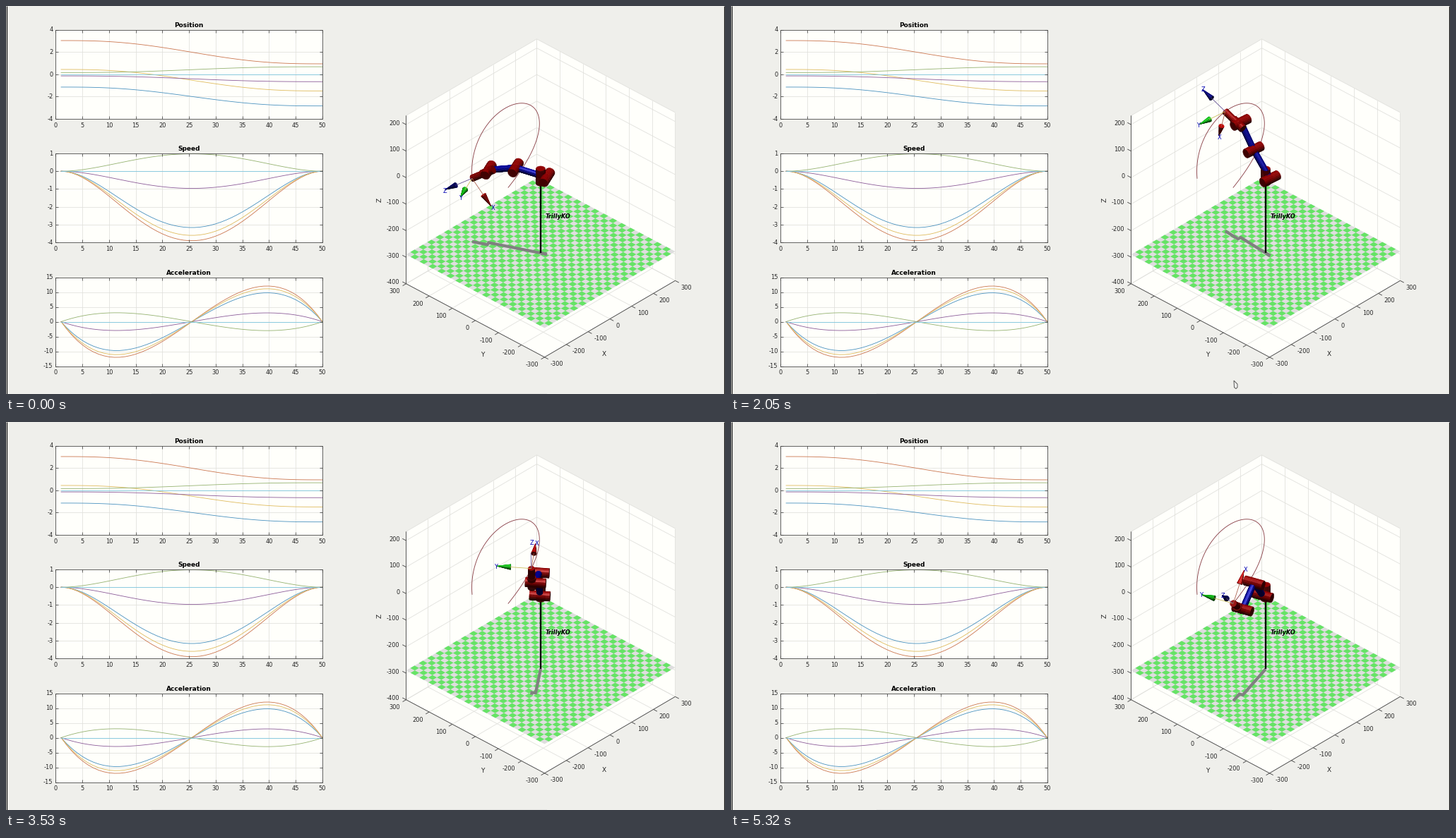
A matplotlib script for the animation above (5380 ms loop, 1018 by 550 pixels).

```python
import numpy as np
import matplotlib.pyplot as plt
from matplotlib.animation import FuncAnimation
from matplotlib.collections import LineCollection, PolyCollection
from matplotlib.patches import PathPatch, Polygon, Rectangle
from matplotlib.path import Path

W, H, DPI = 1018, 550, 64
PT = 72 / DPI                       # points per pixel
LOOP, TICK = 5380, 20
STEPS = 50

plt.rcParams["font.family"] = "DejaVu Sans"
BG, WALL, GRID, INK, EDGE = "#efefeb", "#fffffb", "#e0e0dc", "#262626", "#444444"

fig = plt.figure(figsize=(W / DPI, H / DPI), dpi=DPI, facecolor=BG)
ax = fig.add_axes([0, 0, 1, 1])
ax.set_xlim(-0.5, W - 0.5)
ax.set_ylim(H - 0.5, -0.5)
ax.axis("off")


def text(x, y, s, size=8.2, ha="center", color=INK, **kw):
    """Text whose capitals are centred on y."""
    return ax.text(x, y + 0.365 * size, s, fontsize=size * PT, ha=ha,
                   va="baseline", color=color, **kw)


def lines(segs, color, width=0.8, z=1):
    ax.add_collection(LineCollection(segs, colors=color,
                                     linewidths=width * PT, zorder=z))


def curve(x, y, color, width=0.85, z=2, **kw):
    return ax.plot(x, y, color=color, lw=width * PT, zorder=z, **kw)[0]


# ---- joint trajectory -------------------------------------------------

Q0 = np.array([-1.15, 3.02, 0.43, -0.15, 0.15, 0.0])
DQ = np.array([-1.69, -2.085, -1.925, -0.515, 0.522, 0.0])
TAU = np.linspace(0, 1, STEPS)


def blend(t):
    return 10 * t**3 - 15 * t**4 + 6 * t**5


def joints(t):
    return Q0 + DQ * blend(t)


# ---- left column: three charts ----------------------------------------

COLORS = ["#4a92c0", "#cb7650", "#dfbb5e", "#8c5c9a", "#95b271", "#7cc6de"]
LEFT, RIGHT = 70, 447.5


def chart(title, top, bottom, lo, hi, ticks, data):
    def px(v):
        return LEFT + (RIGHT - LEFT) * v / 50

    def py(v):
        return bottom - (bottom - top) * (v - lo) / (hi - lo)

    ax.add_patch(Rectangle((LEFT, top), RIGHT - LEFT, bottom - top, fc=WALL,
                           ec="none", zorder=0))
    grid, marks = [], []
    for v in range(0, 51, 5):
        x = px(v)
        grid.append([(x, top), (x, bottom)])
        marks += [[(x, bottom), (x, bottom - 4)], [(x, top), (x, top + 4)]]
        text(x, bottom + 8.7, str(v))
    for v in ticks:
        y = py(v)
        grid.append([(LEFT, y), (RIGHT, y)])
        marks += [[(LEFT, y), (LEFT + 4, y)], [(RIGHT, y), (RIGHT - 4, y)]]
        text(LEFT - 4, y, str(v), ha="right")
    frame = [(LEFT, top), (RIGHT, top), (RIGHT, bottom), (LEFT, bottom),
             (LEFT, top)]
    lines(grid, GRID)
    lines(marks + [frame], EDGE, 0.8, 3)
    text((LEFT + RIGHT) / 2, top - 7, title, 9, color="black", weight="bold")
    for row, color in zip(data.T, COLORS):
        curve(px(np.arange(1, STEPS + 1)), py(row), color)


T = TAU[:, None]
chart("Position", 33, 159.5, -4, 4, range(-4, 5, 2), joints(T))
chart("Speed", 208.5, 334.5, -4, 1, range(-4, 2),
      DQ * (30 * T**2 - 60 * T**3 + 30 * T**4))
chart("Acceleration", 384, 510, -15, 15, range(-15, 16, 5),
      DQ * (60 * T - 180 * T**2 + 120 * T**3))

# ---- right side: orthographic 3D box -----------------------------------

CENTER = np.array([756.5, 240.6])
AXES = np.array([[0.3083, -0.1808], [-0.3267, -0.1735], [0, -0.376]])
VIEW = np.array([-0.604, -0.569, 0.558])
LIGHT = np.array([-0.2, -0.12, 0.97])
HALF = (LIGHT + VIEW) / np.linalg.norm(LIGHT + VIEW)
TOP, BASE, FLOOR = 234, -400, -290
TEN = range(-300, 301, 100)


def proj(p):
    return CENTER + np.asarray(p, float) @ AXES


def face(corners, color, z):
    ax.add_patch(Polygon(proj(corners), fc=color, ec="none", zorder=z))


E = 300
face([(-E, E, BASE), (-E, E, TOP), (E, E, TOP), (E, E, BASE)], WALL, 0)
face([(E, E, BASE), (E, E, TOP), (E, -E, TOP), (E, -E, BASE)], WALL, 0)
face([(-E, E, BASE), (E, E, BASE), (E, -E, BASE), (-E, -E, BASE)], WALL, 0)

grid = []
for v in TEN:
    grid += [[(v, E, BASE), (v, E, TOP)], [(E, v, BASE), (E, v, TOP)],
             [(v, -E, BASE), (v, E, BASE)], [(-E, v, BASE), (E, v, BASE)]]
for v in [*range(BASE, 201, 100), TOP]:
    grid.append([(-E, E, v), (E, E, v), (E, -E, v)])
lines([proj(g) for g in grid], GRID)

edges = [proj([(-E, E, TOP), (-E, E, BASE), (-E, -E, BASE), (E, -E, BASE)])]
for v in TEN:
    edges += [proj([(-E, v, BASE), (-E - 16, v, BASE)]),
              proj([(v, -E, BASE), (v, -E - 16, BASE)])]
    x, y = proj((-E, v, BASE))
    text(x - 8.5, y + 10.5, str(v), ha="right")
    x, y = proj((v, -E, BASE))
    text(x + 8, y + 9.5, str(v), ha="left")
for v in range(BASE, 201, 100):
    edges.append(proj([(-E, E, v), (-E, E + 16, v)]))
    x, y = proj((-E, E, v))
    text(x - 9, y - 2.5, str(v), ha="right")
lines(edges, EDGE, 0.85, 1.5)
text(674, 493, "Y", 9)
text(846, 492, "X", 9)
ax.text(529, 274, "Z", fontsize=9 * PT, rotation=90, ha="center",
        va="center", color=INK)

# tiled floor, grey in the corners
face([(-E, E, FLOOR), (E, E, FLOOR), (E, -E, FLOOR), (-E, -E, FLOOR)],
     "#dedede", 2)
TILES = 31
cut = np.linspace(-E, E, TILES + 1)
tiles = []
for i in range(TILES):
    for j in range(1 - i % 2, TILES, 2):
        x0, x1, y0, y1 = cut[i], cut[i + 1], cut[j], cut[j + 1]
        tiles.append(Path(proj([(x0, y0, FLOOR), (x1, y0, FLOOR),
                                (x1, y1, FLOOR), (x0, y1, FLOOR),
                                (x0, y0, FLOOR)]), closed=True))
ax.add_patch(PathPatch(Path.make_compound_path(*tiles), fc="#66e366",
                       ec="none", zorder=2.1))

# ---- robot -------------------------------------------------------------

OFFSET, UPPER, FORE, SIDE, TOOL = 21, 105, 95, 12, 62
RED, BLUE = (0.78, 0.02, 0.02), (0.02, 0.02, 0.85)
UP = np.array([0, 0, 1.0])


def pose(t):
    """Joint points and the tool frame at path fraction t."""
    q = joints(t)
    out = np.array([np.cos(q[0]), np.sin(q[0]), 0])
    side = np.array([np.sin(q[0]), -np.cos(q[0]), 0])

    def ray(a):
        return np.cos(a) * out + np.sin(a) * UP

    shoulder = OFFSET * out
    elbow = shoulder + UPPER * ray(q[1])
    wrist = elbow + FORE * ray(q[1] + q[2])
    hand = wrist + SIDE * side
    pitch = q[1] + q[2] + q[4] - q[3]
    tool = ray(pitch)
    tip = hand + TOOL * tool
    return (shoulder, elbow, wrist, hand, tip), (ray(pitch + np.pi / 2),
                                                 side, tool)


def shade(normal, color):
    diffuse = max(0, normal @ LIGHT)
    gloss = 0.3 * max(0, normal @ HALF) ** 26
    return tuple(np.clip(np.array(color) * (0.2 + 0.55 * diffuse) + gloss,
                         0, 1))


def tube(p0, p1, r0, r1, color, parts=4, n=18):
    """Visible faces of a cylinder or cone as (depth, polygon, colour)."""
    length = np.linalg.norm(p1 - p0)
    axis = (p1 - p0) / length
    u = np.cross(axis, UP if abs(axis[2]) < 0.9 else np.array([1.0, 0, 0]))
    u /= np.linalg.norm(u)
    w = np.cross(axis, u)

    def ring(a):
        return np.cos(a)[:, None] * u + np.sin(a)[:, None] * w

    ang = np.linspace(0, 2 * np.pi, n + 1)
    rim = ring(ang)
    normals = ring(ang[:-1] + np.pi / n) + axis * (r0 - r1) / length
    normals /= np.linalg.norm(normals, axis=1)[:, None]
    f = np.linspace(0, 1, parts + 1)
    rings = [p0 + (p1 - p0) * k + rim * (r0 + (r1 - r0) * k) for k in f]
    faces = []
    for j in np.flatnonzero(normals @ VIEW > 0):
        c = shade(normals[j], color)
        for a, b in zip(rings, rings[1:]):
            quad = np.array([a[j], a[j + 1], b[j + 1], b[j]])
            faces.append((quad.mean(0) @ VIEW, proj(quad), c))
    for p, r, rr, nrm in ((p0, r0, rings[0], -axis), (p1, r1, rings[-1], axis)):
        if r > 0 and nrm @ VIEW > 0:
            faces.append((p @ VIEW, proj(rr[:-1]), shade(nrm, color)))
    return faces


CONES = [(1, 0.03, 0.03), (0.05, 1, 0.08), (0.02, 0.02, 0.65)]


def body(t):
    (sh, el, wr, hand, tip), frame = pose(t)
    side, tool = frame[1], frame[2]
    faces = tube(-28 * UP, 28 * UP, 14.5, 14.5, RED)
    for p in (sh, el, wr):
        faces += tube(p - 32 * side, p + 32 * side, 15, 15, RED, 6)
    faces += tube(sh, el, 9.5, 9.5, BLUE, 8)
    faces += tube(el, wr, 9.5, 9.5, BLUE, 8)
    faces += tube(hand - 24 * tool, hand + 22 * tool, 13, 13, RED)
    faces += tube(hand + 22 * tool, tip, 10.5, 10.5, RED)
    for axis, color in zip(frame, CONES):
        if axis is tool and tool[2] > 0.88:
            continue
        faces += tube(tip + 66 * axis, tip + 110 * axis, 8.5, 0, color, 2, 14)
    faces.sort(key=lambda f: f[0])
    ground = np.array([np.zeros(3), sh, el, wr, hand, tip])
    ground[:, 2] = FLOOR
    spokes = [proj([tip, tip + 68 * a]) for a in frame]
    tags = [proj(tip + 115 * a) for a in frame]
    return ([f[1] for f in faces], [f[2] for f in faces], proj(ground),
            spokes, tags)


BODIES = [body(t) for t in TAU]

path = proj([pose(t)[0][-1] for t in np.linspace(0, 1, 160)])
curve(path[:, 0], path[:, 1], "#8c444b", 0.9, 4)
shadow = curve([], [], "#808080", 4.2, 3, solid_joinstyle="miter",
               solid_capstyle="butt")
pole = proj([(0, 0, FLOOR), (0, 0, -20)])
curve(pole[:, 0], pole[:, 1], "black", 2.4, 3.5, solid_capstyle="butt")
text(763, 298, "TrillyKO", 8.2, "left", "black", weight="bold",
     style="oblique", zorder=4)

arm = PolyCollection([], linewidths=0.5 * PT, zorder=5)
ax.add_collection(arm)
spokes = LineCollection([], colors=["#a85a48", "#c9bb58", "#5d4a90"],
                        linewidths=0.8 * PT, zorder=6)
ax.add_collection(spokes)
tags = [text(0, 0, c, color="#0000b4", zorder=7) for c in "XYZ"]

# ---- screen edges and pointer --------------------------------------------

lines([[(0, -1), (0, H)], [(W - 1, -1), (W - 1, H)]], "#111111", 1.3, 8)
lines([[(206, 549), (766, 549)]], "#e0e0dd", 1.6, 8)
ARROW = np.array([(711.5, 530.5), (716.5, 535.5), (716.5, 540),
                  (714.5, 542), (712, 540)])
pointer = Polygon(ARROW, fc="#f4f4f1", ec="#4a4a4a", lw=0.9 * PT, zorder=9)
ax.add_patch(pointer)

# ---- animation -------------------------------------------------------------

SHOTS = np.round(np.arange(102) * 100 / 19) * 10     # 19 pictures a second


def update(n):
    shot = np.searchsorted(SHOTS, n * TICK + TICK / 2, side="right") - 1
    step = min(STEPS - 1, max(0, (shot - 1) // 2))
    polys, colors, ground, segs, spots = BODIES[step]
    arm.set_verts(polys)
    arm.set_facecolor(colors)
    arm.set_edgecolor(colors)
    shadow.set_data(ground[:, 0], ground[:, 1])
    spokes.set_segments(segs)
    for tag, (x, y) in zip(tags, spots):
        tag.set_position((x + 1.5, y + 3.5))
    ms = SHOTS[shot]
    pointer.set_visible(1680 <= ms < 2700)
    pointer.set_xy(ARROW + [0, 25 * np.clip((ms - 2400) / 300, 0, 1)])
    return [arm, shadow, spokes, pointer, *tags]


anim = FuncAnimation(fig, update, frames=LOOP // TICK, interval=TICK,
                     init_func=lambda: update(0), repeat=True, repeat_delay=0)
plt.show()
```
